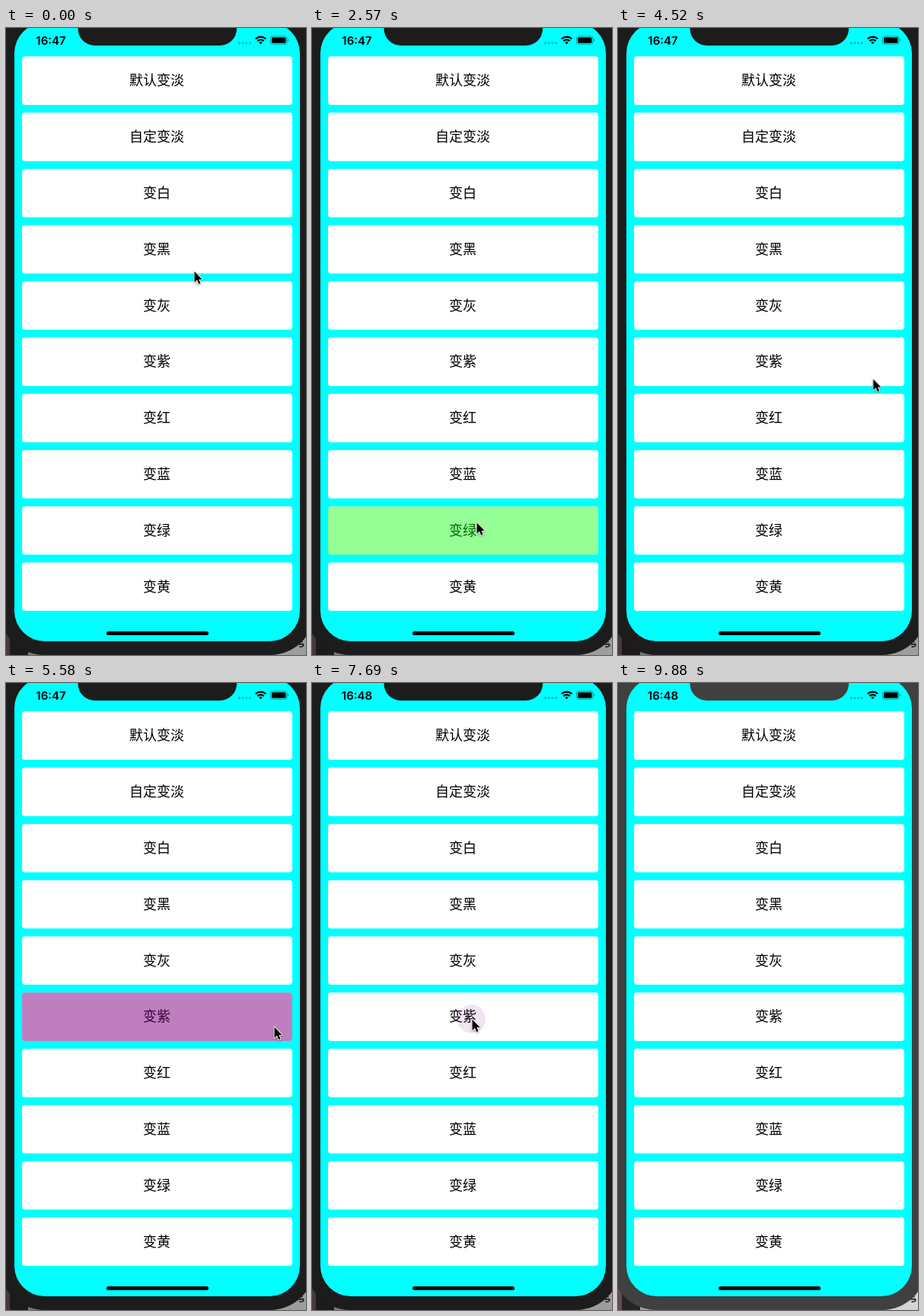
An HTML page that plays this animation: 394x823 px, repeating every 9.98 s.

```html
<!DOCTYPE html>
<html lang="zh-CN">
<head>
<meta charset="utf-8">
<title>按钮点击变色</title>
<style>
  html, body { margin: 0; width: 100%; height: 100%; overflow: hidden; background: #1c1c1c; }
  svg { display: block; width: 394px; height: 823px; }

  .anim, .ripple { animation: 9980ms linear infinite; }

  .label { font: 18px "Noto Sans CJK SC", "Noto Sans CJK", sans-serif; text-anchor: middle; }
  .clock { font: 600 15px Inter, Roboto, sans-serif; text-anchor: middle; }

  .bezel { fill: #1c1c1c; animation-name: bezel; animation-timing-function: step-end; }
  .shade { fill: #000; opacity: .3; animation-name: shade; animation-timing-function: step-end; }
  @keyframes bezel { 0% { fill: #1c1c1c; } 98.99%, 100% { fill: #404040; } }
  @keyframes shade { 0% { opacity: .3; } 98.99%, 100% { opacity: .06; } }

  .before { animation-name: before; animation-timing-function: step-end; }
  .after { animation-name: after; animation-timing-function: step-end; }
  @keyframes before { 0% { opacity: 1; } 77%, 100% { opacity: 0; } }
  @keyframes after { 0% { opacity: 0; } 77%, 100% { opacity: 1; } }

  /* Ripple: grows from the touch point to the button centre, holds, then fades. */
  .ripple { opacity: 0; }
  @keyframes green {
    0%, 21.343% { opacity: 0; transform: translate(var(--dx), var(--dy)) scale(0); }
    24.349% { opacity: 1; transform: translate(0px, 0px) scale(1); }
    24.699% { opacity: 1; transform: translate(0px, 0px) scale(1); animation-timing-function: cubic-bezier(.333, .667, .667, 1); }
    27.705%, 100% { opacity: 0; transform: translate(0px, 0px) scale(1); }
  }
  @keyframes red {
    0%, 36.393% { opacity: 0; transform: translate(var(--dx), var(--dy)) scale(0); }
    39.399% { opacity: 1; transform: translate(0px, 0px) scale(1); }
    41.283% { opacity: 1; transform: translate(0px, 0px) scale(1); animation-timing-function: cubic-bezier(.333, .667, .667, 1); }
    44.289%, 100% { opacity: 0; transform: translate(0px, 0px) scale(1); }
  }
  @keyframes purple {
    0%, 49.349% { opacity: 0; transform: translate(var(--dx), var(--dy)) scale(0); }
    52.355% { opacity: 1; transform: translate(0px, 0px) scale(1); }
    55.050% { opacity: 1; transform: translate(0px, 0px) scale(1); animation-timing-function: cubic-bezier(.333, .667, .667, 1); }
    58.056%, 100% { opacity: 0; transform: translate(0px, 0px) scale(1); }
  }
  @keyframes purple-again {
    0%, 76.754% { opacity: 0; transform: translate(var(--dx), var(--dy)) scale(0); }
    79.760% { opacity: 1; transform: translate(0px, 0px) scale(1); }
    83.126% { opacity: 1; transform: translate(0px, 0px) scale(1); animation-timing-function: cubic-bezier(.333, .667, .667, 1); }
    86.132%, 100% { opacity: 0; transform: translate(0px, 0px) scale(1); }
  }

  .cursor { animation-name: cursor; filter: drop-shadow(0 1px 1px rgba(0, 0, 0, .35)); }
  @keyframes cursor {
    0%, .6% { transform: translate(247px, 319px); }
    1.8% { transform: translate(257px, 306px); }
    2.7%, 4.2% { transform: translate(270px, 292px); }
    7% { transform: translate(261px, 350px); }
    9.5% { transform: translate(237px, 430px); }
    11.5%, 13% { transform: translate(239px, 459px); }
    16% { transform: translate(236px, 580px); }
    18.7%, 21.1% { transform: translate(219px, 681px); }
    23.5%, 25.75% { transform: translate(216px, 649px); }
    28% { transform: translate(222px, 610px); }
    31.1%, 31.6% { transform: translate(241px, 539px); }
    33.8% { transform: translate(262px, 500px); }
    41.4% { transform: translate(262px, 500px); animation-timing-function: ease-in-out; }
    47% { transform: translate(352px, 451px); }
    55.95% { transform: translate(352px, 451px); animation-timing-function: ease-in-out; }
    62.1%, 63% { transform: translate(205px, 368px); }
    65.5% { transform: translate(196px, 356px); }
    67.3% { transform: translate(143px, 395px); }
    69.03% { transform: translate(174px, 432px); }
    70.8% { transform: translate(188px, 448px); }
    73% { transform: translate(188px, 448px); animation-timing-function: ease-in-out; }
    76.2% { transform: translate(210px, 441px); }
    85.2% { transform: translate(210px, 441px); animation-timing-function: ease-in; }
    91.1%, 100% { transform: translate(250px, 830px); }
  }
</style>
</head>
<body>
<svg viewBox="0 0 394 823" xmlns="http://www.w3.org/2000/svg">
  <defs>
    <clipPath id="card"><rect width="355" height="63.6" rx="4"/></clipPath>
    <linearGradient id="desk"><stop offset="0" stop-color="#a8a8a8"/><stop offset="1" stop-color="#e2e2e2"/></linearGradient>
  </defs>

  <!-- desktop behind the phone -->
  <rect y="780" width="394" height="43" fill="url(#desk)"/>
  <rect y="780" width="29" height="43" fill="#2b2528"/>
  <rect y="780" width="5" height="43" fill="#6b4f59"/>
  <text x="385" y="814" transform="rotate(-20 385 814)" font-family="Liberation Sans, sans-serif" font-weight="700" font-size="15" fill="#2a1c1c">s</text>
  <rect class="anim shade" y="780" width="394" height="43"/>

  <!-- phone -->
  <rect class="anim bezel" x="-8" y="-80" width="413" height="903" rx="58"/>
  <rect x="11" y="-7" width="375" height="812" rx="40" fill="#0ff"/>
  <path class="anim bezel" d="M94.5-8V1A22 22 0 0 0 116.500 23H281A22 22 0 0 0 303 1V-8Z"/>

  <!-- status bar -->
  <text class="clock anim before" x="59" y="21.500">16:47</text>
  <text class="clock anim after" x="59" y="21.500">16:48</text>
  <g fill="#00c4c8">
    <circle cx="306.300" cy="19.800" r="1.700"/><circle cx="311" cy="19.800" r="1.700"/>
    <circle cx="315.700" cy="19.800" r="1.700"/><circle cx="320.400" cy="19.800" r="1.700"/>
  </g>
  <g fill="none" stroke="#000" stroke-width="2.200">
    <path d="M327.800 14.300A9.600 9.600 0 0 1 341.200 14.300"/>
    <path d="M330.400 17.100A5.900 5.900 0 0 1 338.600 17.100"/>
    <path d="M332.400 19L334.500 21.300L336.600 19A3 3 0 0 0 332.400 19Z" fill="#000" stroke="none"/>
  </g>
  <rect x="347.500" y="10.800" width="21.500" height="10.400" rx="2.800" fill="none" stroke="#000" stroke-opacity=".4"/>
  <rect x="349" y="12.300" width="18.500" height="7.400" rx="1.500"/>
  <path d="M370.200 14.200A2 2 0 0 1 370.200 17.800Z" fill-opacity=".45"/>

  <g id="list"></g>
  <rect x="132" y="792" width="134" height="5" rx="2.500"/>

  <g class="anim cursor">
    <path d="M.5.5V15L3.900 11.800L6.100 16.900L8.500 15.900L6.300 10.900H10.600Z" stroke="#fff" stroke-width="1.800" stroke-linejoin="round" paint-order="stroke"/>
  </g>
</svg>
<script>
  const names = ['默认变淡', '自定变淡', '变白', '变黑', '变灰', '变紫', '变红', '变蓝', '变绿', '变黄'];
  // row, fill, keyframes, touch offset from the button centre
  const taps = [
    [8, '#0f0', 'green', 20, 9],
    [6, '#f00', 'red', 64, -12],
    [5, '#800080', 'purple', 154, 13],
    [5, '#800080', 'purple-again', 12, 3]
  ];

  const ripple = ([, fill, anim, dx, dy]) =>
    `<circle class="ripple" r="180.3" fill="${fill}" style="animation-name:${anim};--dx:${dx}px;--dy:${dy}px"/>`;

  const button = (name, row) => `
    <g transform="translate(21 ${(37.3 + 73.8 * row).toFixed(1)})">
      <rect width="355" height="63.6" rx="4" fill="#fff"/>
      <text class="label" x="177" y="38.2">${name}</text>
      <g clip-path="url(#card)"><g transform="translate(177.5 31.8)">
        ${taps.filter(tap => tap[0] === row).map(ripple).join('')}
      </g></g>
    </g>`;

  document.getElementById('list').innerHTML = names.map(button).join('');
</script>
</body>
</html>
```
